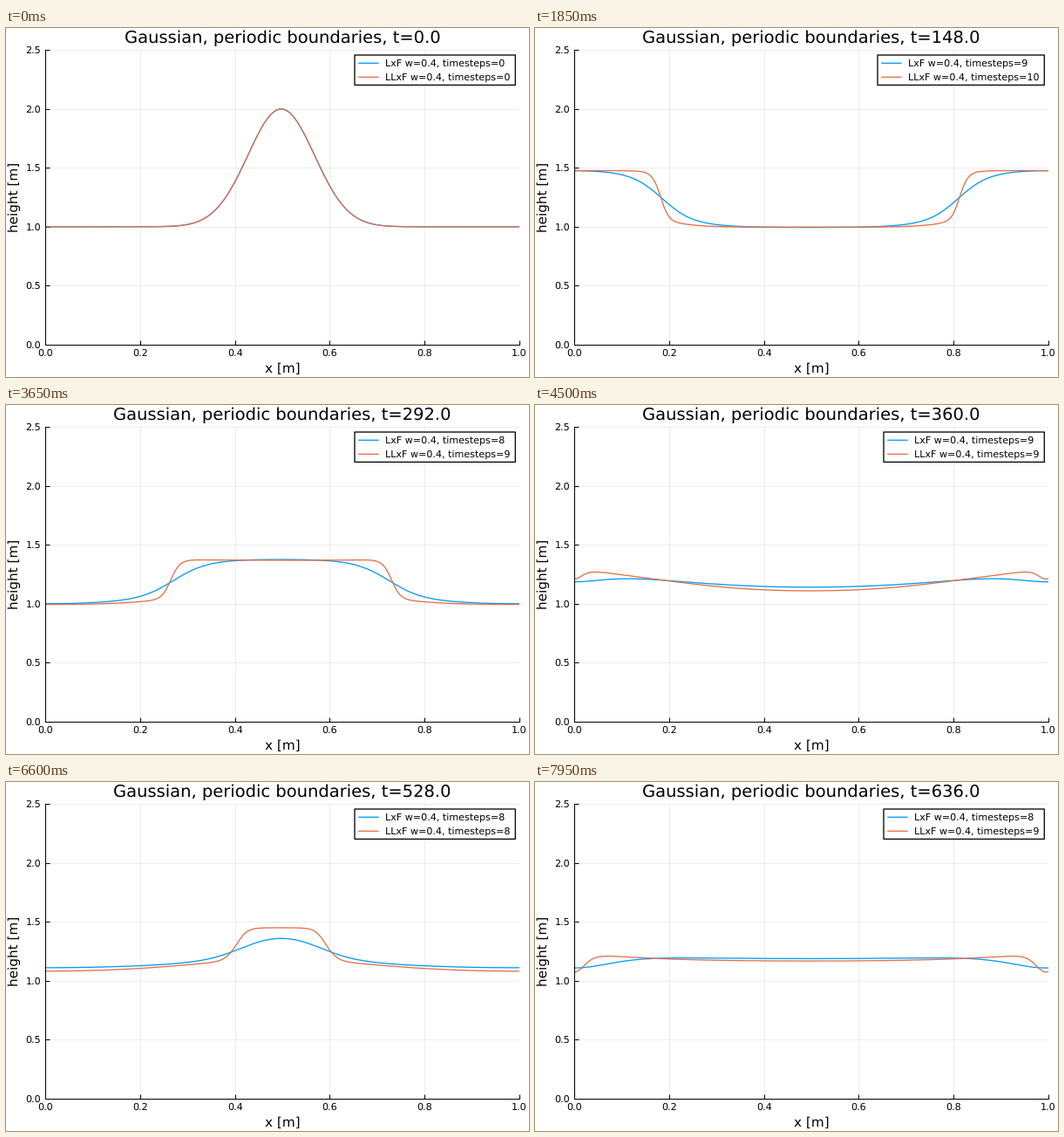
Write a matplotlib script that moves like this. It is 600 px wide and 400 px high and loops after 8000 ms.

```python
import numpy as np
import matplotlib.pyplot as plt
from matplotlib.animation import FuncAnimation
from matplotlib.patches import Rectangle

plt.rcParams.update({
    "font.family": "DejaVu Sans",
    "text.hinting": "none",
    "text.hinting_factor": 8,
})

W, H, DPI = 600, 400, 100
FRAMES, INTERVAL = 160, 50
PX = 72 / DPI                      # one pixel in points
BLUE, ORANGE = "#009afa", "#e36f47"
LEFT, RIGHT, TOP, BOTTOM = 45.2, 588.9, 25.3, 362.8

# Shallow water equations on a periodic domain
G = 9.81
CELLS = 200
DX = 1 / CELLS
CFL = 0.4
STEP_MS = 4


def flux(q):
    h, m = q
    return np.array([m, m * m / h + 0.5 * G * h * h])


def wave_speed(q):
    h, m = q
    return np.abs(m / h) + np.sqrt(G * h)


def advance(q, span, local):
    """Integrate over span; return the new state and the step count."""
    t, count = 0.0, 0
    while span - t > 1e-12:
        speed = wave_speed(q)
        dt = min(CFL * DX / speed.max(), span - t)
        right = np.roll(q, -1, axis=1)
        a = np.maximum(speed, np.roll(speed, -1)) if local else DX / dt
        f = 0.5 * (flux(q) + flux(right)) - 0.5 * a * (right - q)
        q = q - dt / DX * (f - np.roll(f, 1, axis=1))
        t += dt
        count += 1
    return q, count


def simulate(local):
    """Heights, with a ghost cell at each end, and step counts."""
    cells = np.arange(1, CELLS + 1) * DX
    h = 1 + np.exp(-100 * (cells - 0.5) ** 2)
    q, count = np.array([h, np.zeros(CELLS)]), 0
    states = []
    for i in range(FRAMES):
        if i:
            q, count = advance(q, STEP_MS / 1000, local)
        states.append((np.pad(q[0], 1, mode="wrap"), count))
    return states


lxf, llxf = simulate(False), simulate(True)

fig = plt.figure(figsize=(W / DPI, H / DPI), dpi=DPI, facecolor="white")

ax = fig.add_axes([LEFT / W, 1 - BOTTOM / H,
                   (RIGHT - LEFT) / W, (BOTTOM - TOP) / H])
ax.set(xlim=(0, 1), ylim=(0, 2.5))
xticks, yticks = np.linspace(0, 1, 6), np.linspace(0, 2.5, 6)
ax.set_xticks(xticks)
ax.set_yticks(yticks)
ax.tick_params(direction="in", length=5 * PX, width=PX,
               labelbottom=False, labelleft=False)
ax.set_axisbelow(True)
ax.grid(color="black", alpha=0.07, lw=PX)
ax.spines[["top", "right"]].set_visible(False)
ax.spines[["left", "bottom"]].set_linewidth(PX)

x = np.linspace(0, 1, CELLS + 2)
curves = [ax.plot(x, lxf[0][0], color=BLUE, lw=1.3 * PX)[0],
          ax.plot(x, llxf[0][0], color=ORANGE, lw=1.3 * PX)[0]]

# Overlay in pixel coordinates for text and legend
page = fig.add_axes([0, 0, 1, 1], zorder=5)
page.set(xlim=(0, W), ylim=(H, 0))
page.axis("off")


def label(px, py, text, size, ha="center", rotation=0):
    return page.text(px, py, text, size=size, ha=ha, va="baseline",
                     rotation=rotation, rotation_mode="anchor")


for v in xticks:
    label(LEFT + v * (RIGHT - LEFT), 376, f"{v:.1f}", 8)
for v in yticks:
    label(40, BOTTOM - v / 2.5 * (BOTTOM - TOP) + 4, f"{v:.1f}", 8, "right")
label(317, 395, "x [m]", 11)
label(14, 194, "height [m]", 11, rotation=90)
title = label(317, 17.4, "", 14)

BOX_LEFT, BOX_RIGHT, BOX_TOP, BOX_BOTTOM = 400, 584.3, 31, 65.4
box = Rectangle((BOX_LEFT, BOX_TOP), BOX_RIGHT - BOX_LEFT,
                BOX_BOTTOM - BOX_TOP, fc="white", ec="black",
                lw=1.3 * PX, joinstyle="round", snap=False)
page.add_patch(box)
keys, names = [], []
for row, color in ((40.3, BLUE), (56.3, ORANGE)):
    keys.append(page.plot([0, 0], [row, row], color=color, lw=1.3 * PX,
                          solid_capstyle="butt", snap=False)[0])
    names.append(label(0, row + 3.7, "", 8, "left"))


def update(i):
    counts = lxf[i][1], llxf[i][1]
    for curve, run in zip(curves, (lxf, llxf)):
        curve.set_ydata(run[i][0])
    title.set_text(f"Gaussian, periodic boundaries, t={STEP_MS * i:.1f}")

    # the box grows by one digit for two-digit counts
    left = BOX_LEFT - 7 * (max(counts) > 9)
    box.set_x(left)
    box.set_width(BOX_RIGHT - left)
    for key, name, scheme, n in zip(keys, names, ("LxF", "LLxF"), counts):
        key.set_xdata([left + 4.2, left + 27.7])
        name.set_x(left + 35)
        name.set_text(f"{scheme} w={CFL}, timesteps={n}")
    return [*curves, title, box, *keys, *names]


anim = FuncAnimation(fig, update, frames=FRAMES, interval=INTERVAL,
                     repeat=True, repeat_delay=0, blit=False)
plt.show()
```
